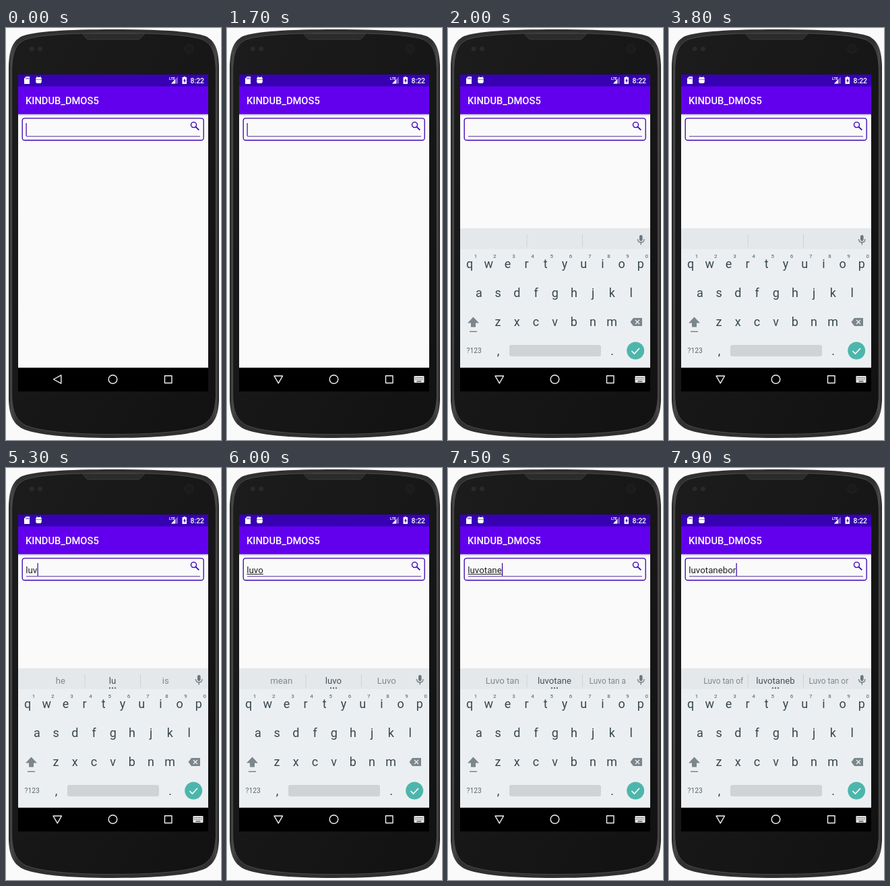
Recreate the animation shown at these times as an HTML page. Size 319 by 611 pixels, loop 8 s.

```html
<!DOCTYPE html>
<html lang="en">
<head>
<meta charset="utf-8">
<title>Phone search</title>
<style>
  html, body { margin: 0; width: 100%; height: 100%; overflow: hidden; background: #fafafa; }
  svg { display: block; width: 100%; height: 100%; font-family: Roboto, sans-serif; }
  .mid { text-anchor: middle; }
  .keys { font-size: 18px; fill: #37474f; }
  .digits { font-size: 8px; font-weight: 500; fill: #6d787d; }
  .hints { font-size: 13.2px; fill: #80888c; }
  .nav { fill: none; stroke: #f2f2f2; stroke-width: 1.4; stroke-linejoin: round; }
</style>
</head>
<body>
<svg viewBox="0 0 319 611">
  <defs>
    <linearGradient id="rim" x2="1" y2="0">
      <stop offset="0" stop-color="#202020"/><stop offset=".012" stop-color="#484848"/>
      <stop offset=".04" stop-color="#303030"/><stop offset=".96" stop-color="#303030"/>
      <stop offset=".988" stop-color="#484848"/><stop offset="1" stop-color="#202020"/>
    </linearGradient>
    <linearGradient id="face" x2="1" y2="1">
      <stop offset="0" stop-color="#1c1c1c"/><stop offset="1" stop-color="#121212"/>
    </linearGradient>
    <linearGradient id="shade" x2="0" y2="1">
      <stop offset="0" stop-opacity=".28"/><stop offset="1" stop-opacity="0"/>
    </linearGradient>
    <clipPath id="content"><path d="M18 127H300V503.800H18Z"/></clipPath>
    <path id="shell" d="M4 56C5 31 10 19 24 12C44 5 90 2 160 2S276 5 296 12C310 19 315 31 316 56V552C315 574 310 586 296 594C276 603 230 608 160 608S44 603 24 594C10 586 5 574 4 552Z"/>
  </defs>

  <!-- Phone -->
  <use href="#shell" fill="url(#rim)"/>
  <use href="#shell" fill="url(#face)" stroke="#4c4c4c" transform="translate(4.800 5.500) scale(.97 .982)"/>
  <path d="M113 8.500L120 16Q121 17 124 17H195Q198 17 199 16L206 8.500Z" fill="#2b2b2b" stroke="#3a3a3a"/>
  <g fill="#292929"><circle cx="38" cy="31" r="3.500"/><circle cx="50.500" cy="31" r="3.500"/></g>
  <circle cx="271.500" cy="31" r="6.500" fill="#1b1b1b" stroke="#242424"/>

  <!-- Screen -->
  <path d="M18 69H300V539H18Z" fill="#fafafa"/>
  <path d="M18 127H300V131H18Z" fill="url(#shade)"/>
  <path d="M18 86H300V127.700H18Z" fill="#6200ee"/>
  <path d="M18 69H300V86.600H18Z" fill="#3700b3"/>
  <g fill="#fff">
    <path d="M29.500 72H35V83H27V75Z"/>
    <path d="M29.800 73.500v2.500M31.600 73.500v2.500M33.400 73.500v2.500" stroke="#3700b3" stroke-width=".8"/>
    <path d="M44.200 76.500V75Q44.200 73 46 73H51Q52.800 73 52.800 75V76.500ZM44.200 77H52.800V79.500Q52.800 82 50.500 82H46.500Q44.200 82 44.200 79.500Z"/>
    <path d="M45.500 71.500l1.500 2M51.500 71.500l-1.500 2" stroke="#fff" stroke-width=".8"/>
    <text x="242" y="77" font-size="5.500" font-weight="700">LTE</text>
    <path d="M255 72V82.500H245Z" opacity=".35"/>
    <path d="M251 76.200V82.500H245Z"/>
    <path d="M263.500 72H266V73H268V83H261.500V73H263.500Z"/>
    <path d="M265.500 74.500L263 78.500H264.500V81.500L267 77.500H265.500Z" fill="#3700b3"/>
    <text x="273.500" y="81.500" font-size="10.400" font-weight="500">8:22</text>
    <text x="29" y="112.900" font-size="14.700" font-weight="500">KINDUB_DMOS5</text>
  </g>

  <!-- Search field -->
  <rect x="24.200" y="133.800" width="269" height="32.700" rx="3.500" fill="none" stroke="#3700b3" stroke-width="1.300"/>
  <path d="M30 160.700H288" stroke="#5433a8"/>
  <g fill="none" stroke="#3700b3" stroke-width="1.400">
    <circle cx="278.500" cy="143.600" r="4"/><path d="M281.500 146.600L286.300 151.300" stroke-width="1.700"/>
  </g>
  <text id="typed" x="29.300" y="155.800" font-size="13.300" fill="#212121"></text>
  <path id="composing" stroke="#212121"/>
  <rect id="caret" y="141" width="1.200" height="19" fill="#3700b3"/>

  <!-- Keyboard -->
  <g clip-path="url(#content)">
    <g id="keyboard">
      <path d="M18 297H300V299H18Z" fill="#e6e9eb"/>
      <path d="M18 298.500H300V328H18Z" fill="#e4e8eb"/>
      <path d="M18 328H300V504H18Z" fill="#eceff1"/>
      <path d="M117 306V325M199.500 306V325" stroke="#cdd2d5"/>
      <g class="hints mid">
        <text id="left" x="80.800" y="319.700"></text>
        <text id="middle" x="158" y="319.700" fill="#455057"></text>
        <text id="right" x="236.800" y="319.700"></text>
      </g>
      <g id="dots" fill="#455057"><circle cx="154" cy="326.300" r="1.100"/><circle cx="158" cy="326.300" r="1.100"/><circle cx="162" cy="326.300" r="1.100"/></g>
      <rect x="284" y="307" width="4.600" height="9" rx="2.300" fill="#6c777c"/>
      <path d="M281.500 313Q281.500 318 286.300 318T291 313M286.300 318V321.500" fill="none" stroke="#6c777c" stroke-width="1.300"/>
      <g id="keys" class="keys mid"></g>
      <g id="digits" class="digits mid"></g>
      <path d="M37.500 428.500L46 437.500H41V443.500H34V437.500H29Z" fill="#7b878c"/>
      <path d="M32 450.300H43" stroke="#7b878c" stroke-width="1.500"/>
      <path d="M270.500 436L275 430H288V442H275Z" fill="#7b878c"/>
      <path d="M278 433L284 439M284 433L278 439" stroke="#eceff1" stroke-width="1.400"/>
      <text x="27.600" y="482.200" font-size="10.300" fill="#5b686e">?123</text>
      <g class="keys mid"><text x="74.500" y="485">,</text><text x="243.500" y="485">.</text></g>
      <rect x="91" y="470" width="136" height="17" rx="3" fill="#cfd3d5"/>
      <circle cx="278.200" cy="478.500" r="13" fill="#4db6ac"/>
      <path d="M272.500 479L276.500 483L284 475" fill="none" stroke="#fff" stroke-width="1.600"/>
    </g>
  </g>

  <!-- Navigation bar -->
  <path d="M18 503.800H300V539H18Z"/>
  <g class="nav">
    <path id="back"/>
    <circle cx="158.500" cy="521" r="6.300"/>
    <path d="M235.500 515.800H246V526.500H235.500Z"/>
  </g>
  <g id="switcher">
    <rect x="277.500" y="516" width="15" height="10" rx="1" fill="#e6e6e6"/>
    <path d="M279.500 518.500H291M279.500 521H291" stroke="#333" stroke-width="1.200" stroke-dasharray="1.200 1.200"/>
    <path d="M281.500 524H288.500" stroke="#333" stroke-width="1.200"/>
  </g>
</svg>
<script>
const LOOP = 8000;
const NAME = "luvotanebor";
const BLINKS = [300, 700, 1200, 1400, 1900, 2400, 2900, 3300, 3800, 4300, 4700, 4900, 6000, 6500];
// Time, letters typed, then the outer suggestions once they refresh.
const STEPS = [
  [4900, 1], [5000, 1, "I", "is"],
  [5100, 2], [5200, 2, "he", "is"],
  [5300, 3], [5400, 3, "year", "sea"],
  [5500, 4], [5600, 4, "mean", "Luvo"],
  [6800, 5], [6900, 5, "meant", "Luvo"],
  [7000, 6], [7100, 6, "month", "Luvo t"],
  [7200, 7], [7400, 8], [7500, 8, "Luvo tan", "Luvo tan a"],
  [7600, 9], [7700, 9, "Luvo tan of", "Luvo tan or"],
  [7800, 10], [7900, 11]
];
const $ = id => document.getElementById(id);
const show = (id, on) => $(id).setAttribute("visibility", on ? "visible" : "hidden");

function addRow(group, letters, x, y) {
  $(group).innerHTML += [...letters]
    .map((c, i) => `<text x="${x + i * 28.2}" y="${y}">${c}</text>`).join("");
}
addRow("keys", "qwertyuiop", 32, 356.3);
addRow("keys", "asdfghjkl", 46, 399.3);
addRow("keys", "zxcvbnm", 74, 442.3);
addRow("digits", "1234567890", 41, 341);

function setHint(id, text) {
  $(id).textContent = text;
  $(id).style.fontSize = text.length > 9 ? "11.9px" : "";
}

function render(t) {
  const past = STEPS.filter(s => s[0] <= t);
  const [, count, fresh] = past.at(-1) || [0, 0];
  const hint = past.filter(s => s[2]).at(-1);

  $("typed").textContent = NAME.slice(0, count);
  const end = 29.3 + (count ? $("typed").getComputedTextLength() : 0);
  $("caret").setAttribute("x", end + 0.2);
  show("caret", BLINKS.filter(b => b <= t).length % 2 === 0);
  $("composing").setAttribute("d", `M29.3 157.500H${end}`);
  show("composing", fresh);

  setHint("left", hint ? hint[2] : "");
  setHint("middle", hint ? NAME.slice(0, hint[1]) : "");
  setHint("right", hint ? hint[3] : "");
  show("dots", hint);

  const open = t >= 1700;
  $("back").setAttribute("d", open ? "M70 516H82.500L76.300 526.800Z" : "M70.500 521L81.800 514.800V527.200Z");
  show("switcher", open);

  const rising = t < 2000;
  show("keyboard", t >= 1900);
  $("keyboard").setAttribute("transform", `translate(0 ${rising ? 10 : 0})`);
  $("keyboard").setAttribute("opacity", rising ? 0.7 : 1);
}

const start = performance.now();
function tick() {
  render((performance.now() - start) % LOOP);
  requestAnimationFrame(tick);
}
tick();
</script>
</body>
</html>
```
